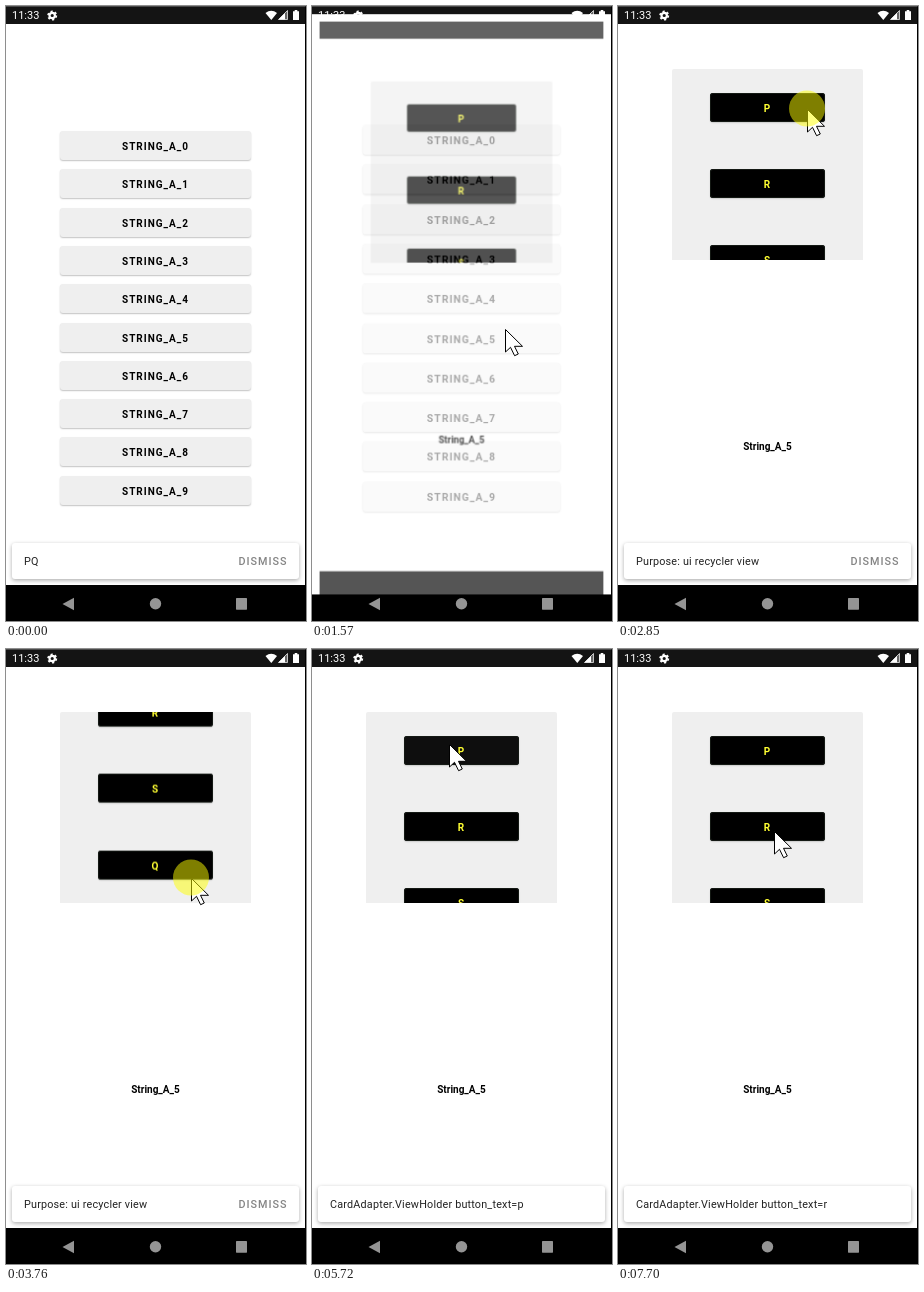
An HTML page that plays this animation: 300 px wide and 615 px high, repeating every 8000 ms.

```html
<!DOCTYPE html>
<html lang="en">
<head>
<meta charset="utf-8">
<title>Recycler view demo</title>
<style>
  html, body { margin: 0; width: 100%; height: 100%; overflow: hidden; background: #000; }
  #stage { position: relative; width: 300px; height: 615px; overflow: hidden; font-family: Roboto, sans-serif; }
  #stage * { box-sizing: border-box; }
  /* every animation shares one 8 s clock */
  .anim { animation: 8s linear infinite both; }
  .win { position: absolute; left: 0; top: 0; width: 299px; height: 615px;
    background: linear-gradient(#141414 18px, #fff 0 579px, #000 0); }

  .btn { position: absolute; height: 29px; border-radius: 3px; text-align: center;
    font-weight: 700; font-size: 10px; letter-spacing: .1em; }
  .list .btn { left: 54px; width: 191px; line-height: 32px; background: #efefef; color: #000;
    box-shadow: 0 1px 1.5px rgba(0,0,0,.24); }

  .view { position: absolute; left: 54px; top: 63px; width: 191px; height: 191px; overflow: hidden;
    border-radius: 2px 2px 0 0; background: #efefef; }
  .item { position: relative; height: 76.2px; }
  .item .btn { left: 38px; top: 24px; width: 115px; line-height: 31px; background: #000; color: #ffff32;
    box-shadow: 0 1px 1.5px rgba(0,0,0,.15), inset 0 0 0 1px #141914; }
  .glow { position: absolute; left: -315px; top: -863px; width: 882px; height: 882px; border-radius: 50%;
    background: rgba(0,0,0,.105); }
  .title { position: absolute; top: 434px; width: 100%; text-align: center; font: 700 10px/14px Roboto, sans-serif; color: #000; }

  .snack { position: absolute; left: 6px; top: 537px; width: 287px; height: 36px; padding: 0 12px;
    border-radius: 3px; background: #fff; box-shadow: 0 1.5px 4px rgba(0,0,0,.33);
    font-size: 10.8px; line-height: 38px; letter-spacing: .0178em; color: #222; white-space: pre; }
  .snack b { position: absolute; right: 11.5px; font-weight: 500; letter-spacing: .0893em; color: #858585; }

  svg { position: absolute; left: 0; top: 0; overflow: visible; }
  .edge { position: absolute; inset: 0; border-top: 1px solid #4a4a4a; border-right: 1px solid #000; }

  .old { animation-name: old; }
  .new { animation-name: new, show; }
  .s0 { animation-name: s0; }
  .s1 { animation-name: s1; }
  .s2 { animation-name: s2; }
  .s3 { animation-name: s3; }
  .rows { animation-name: scroll; }
  .glow { animation-name: glow; }
  .cursor { animation-name: move; }
  .dot { animation-name: press; animation-timing-function: step-end; }
  .tap5 { animation-name: tap5; }
  .tapP { animation-name: tapP; }
  .tapR { animation-name: tapR; }

  @keyframes old {
    0%, 18.2% { transform: scale(1); animation-timing-function: cubic-bezier(.5,0,.7,.6); }
    19.625% { transform: scale(1.034); animation-timing-function: cubic-bezier(.1,.6,.2,1); }
    22.75%, 100% { transform: scale(1.05); }
  }
  @keyframes new {
    0%, 18.2% { transform: scale(.85); animation-timing-function: cubic-bezier(.5,0,.7,.6); }
    19.625% { transform: scale(.948); animation-timing-function: cubic-bezier(.1,.6,.2,1); }
    22.75%, 100% { transform: scale(1); }
  }
  @keyframes show {
    0%, 18.8% { opacity: 0; }
    19.625% { opacity: .66; }
    20.1%, 100% { opacity: 1; }
  }
  @keyframes s0 {
    0%, 18.12% { opacity: 1; }
    18.13%, 100% { opacity: 0; }
  }
  @keyframes s1 {
    0%, 20.6% { opacity: 0; transform: scale(.8); }
    22.5%, 56.25% { opacity: 1; transform: none; }
    57.25%, 100% { opacity: 0; transform: none; }
  }
  @keyframes s2 {
    0%, 69.5% { opacity: 0; transform: scale(.8); }
    71.4%, 93.25% { opacity: 1; transform: none; }
    94.2%, 100% { opacity: 0; transform: none; }
  }
  @keyframes s3 {
    0%, 94.3% { opacity: 0; transform: scale(.8); }
    96.2%, 100% { opacity: 1; transform: none; }
  }
  @keyframes scroll {
    0%, 35.75% { transform: none; }
    36.75%, 38.625% { transform: translateY(-66px); animation-timing-function: ease-out; }
    42.5%, 47.0625% { transform: translateY(-114.4px); }
    48.5%, 49.375% { transform: translateY(-10px); }
    50.125%, 100% { transform: none; }
  }
  @keyframes glow {
    0%, 50.125% { opacity: 0; transform: translateY(-19px); animation-timing-function: ease-out; }
    53.75%, 59.5% { opacity: 1; transform: none; }
    65.25%, 100% { opacity: 0; transform: translateY(-19px); }
  }
  @keyframes move {
    0%, 1.2% { transform: translate(301px, 616px); animation-timing-function: cubic-bezier(.3,.3,.4,1); }
    8%, 25.875% { transform: translate(193px, 323px); animation-timing-function: ease-in-out; }
    28.5%, 31.75% { transform: translate(178px, 253px); }
    32.625%, 34.5% { transform: translate(170px, 242px); animation-timing-function: ease-out; }
    35.5%, 35.75% { transform: translate(189px, 103px); }
    36.75%, 39.125% { transform: translate(190px, 30px); animation-timing-function: ease-in-out; }
    46.25%, 47.0625% { transform: translate(185px, 229px); }
    48.5%, 49.375% { transform: translate(184px, 342px); animation-timing-function: ease-out; }
    53.125%, 55% { transform: translate(184px, 400px); animation-timing-function: ease-in-out; }
    59%, 59.5% { transform: translate(176px, 216px); animation-timing-function: ease-in-out; }
    65.25%, 80.75% { transform: translate(137px, 95px); }
    81.625% { transform: translate(148px, 125px); }
    82.625%, 85.125% { transform: translate(138px, 143px); animation-timing-function: ease-in-out; }
    89.75%, 100% { transform: translate(156px, 182px); }
  }
  @keyframes press {
    0% { opacity: 0; }
    8.75% { opacity: .5; }
    10.75% { opacity: 0; }
    35.25% { opacity: .5; }
    39.125% { opacity: 0; }
    46.375% { opacity: .5; }
    55% { opacity: 0; }
    67.125% { opacity: .5; }
    68.75% { opacity: 0; }
    92% { opacity: .5; }
    93.5%, 100% { opacity: 0; }
  }
  @keyframes tap5 {
    0%, 8.75% { background-color: #efefef; }
    10.75%, 11.75% { background-color: #dadada; }
    13.25%, 100% { background-color: #efefef; }
  }
  @keyframes tapP {
    0%, 67.125% { background-color: #000; }
    68.75% { background-color: #1e1e1e; }
    71.4%, 80.75% { background-color: #0e0e0e; }
    82.5%, 100% { background-color: #000; }
  }
  @keyframes tapR {
    0%, 92% { background-color: #000; }
    93.5% { background-color: #1e1e1e; }
    96.2%, 100% { background-color: #000; }
  }
</style>
</head>
<body>
<div id="stage">
  <div class="win old anim">
    <div class="list"></div>
    <div class="snack s0 anim">PQ<b>DISMISS</b></div>
  </div>

  <div class="win new anim">
    <div class="view">
      <div class="rows anim">
        <div class="item"><div class="btn tapP anim">P</div></div>
        <div class="item"><div class="btn tapR anim">R</div></div>
        <div class="item"><div class="btn">S</div></div>
        <div class="item"><div class="btn">Q</div></div>
      </div>
      <div class="glow anim"></div>
    </div>
    <div class="title">String_A_5</div>
    <div class="snack s1 anim">Purpose: ui recycler view<b>DISMISS</b></div>
    <div class="snack s2 anim">CardAdapter.ViewHolder button_text=p</div>
    <div class="snack s3 anim">CardAdapter.ViewHolder button_text=r</div>
  </div>

  <svg width="300" height="615" fill="#fff">
    <text x="6" y="13.3" font-size="11" font-family="Roboto, sans-serif">11:33</text>
    <g fill="none" stroke="#fff">
      <circle cx="46.2" cy="9.5" r="2.7" stroke-width="2.2"/>
      <circle cx="46.2" cy="9.5" r="4.2" stroke-width="1.6" stroke-dasharray="2.2 2.2"/>
    </g>
    <path d="M259.5 7Q265.3 2.6 271 7L265.3 14Z"/>
    <path d="M281.5 4.5V13.5H272.5Z" fill-opacity=".35"/>
    <path d="M279 7V13.5H272.5Z"/>
    <path d="M281.5 4.5V13.5H272.5Z" fill="none" stroke="#fff" stroke-width=".7"/>
    <path d="M287 5.2H288.7V4H291.3V5.2H293V14H287Z"/>
    <g fill="#949494">
      <path d="M56.5 598L68 591.7V604.3Z"/>
      <circle cx="149.5" cy="597.7" r="5.7"/>
      <rect x="230" y="592" width="11" height="11.7" rx=".6"/>
    </g>
  </svg>
  <div class="edge"></div>

  <svg class="cursor anim" width="20" height="28">
    <path d="M.5 .5V23L5.5 18.3L9.6 26.7L13.3 25L9.5 17.3H17.5Z" fill="#fff" stroke="#000"/>
    <circle class="dot anim" cx="0" cy="-.5" r="18" fill="#ff0"/>
  </svg>
</div>
<script>
  const list = document.querySelector(".list");
  for (let i = 0; i < 10; i++) {
    const btn = document.createElement("div");
    btn.className = i === 5 ? "btn tap5 anim" : "btn";
    btn.style.top = 125 + i * 38.3 + "px";
    btn.textContent = "STRING_A_" + i;
    list.append(btn);
  }
</script>
</body>
</html>
```
